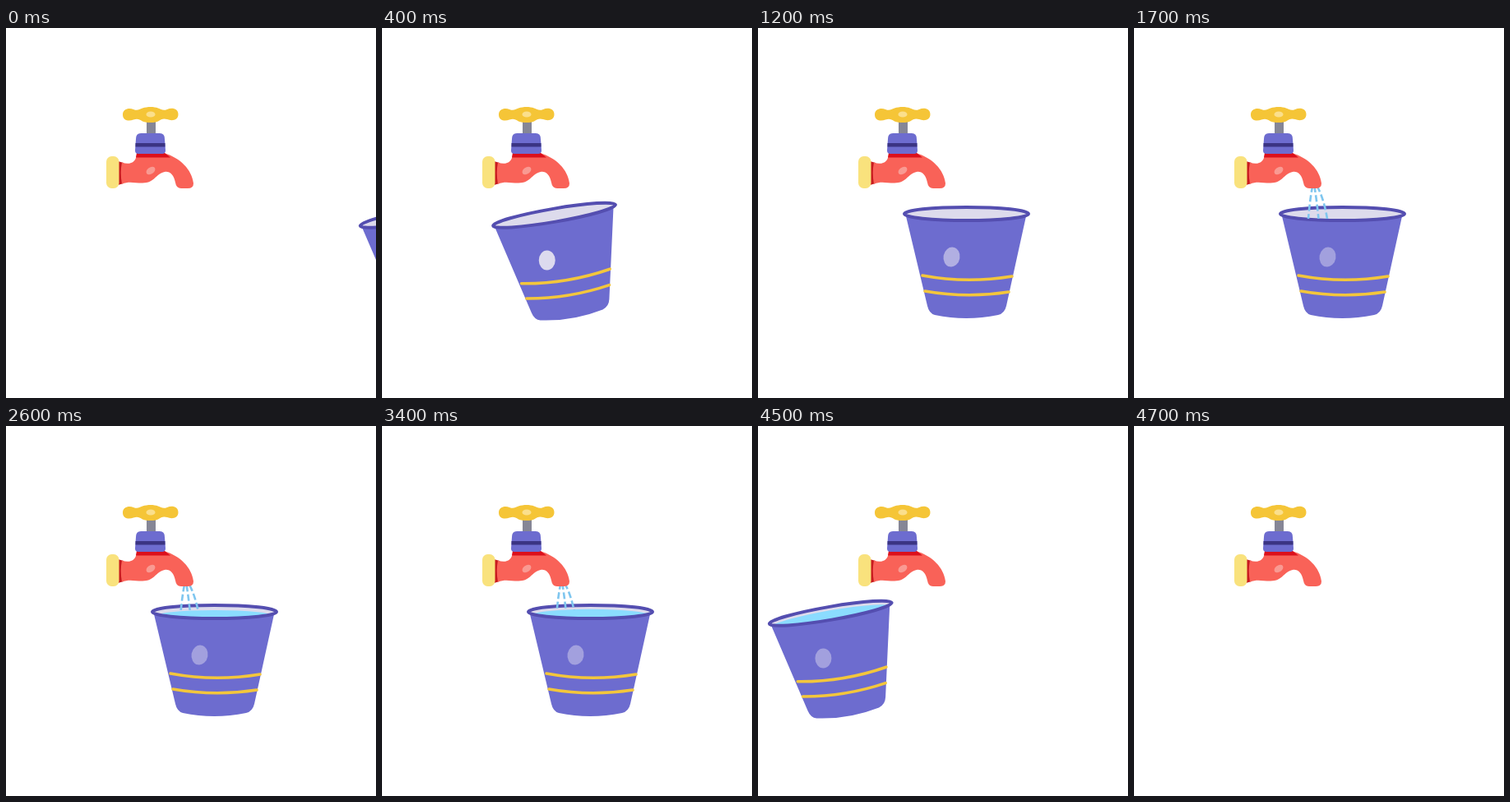
Write an HTML page that moves like this. It is 450 px wide and 450 px high and loops after 5000 ms.

```html
<!DOCTYPE html>
<html lang="en">
<head>
<meta charset="utf-8">
<title>Tap and bucket</title>
<style>
  html, body { margin: 0; width: 100%; height: 100%; overflow: hidden; background: #fff; }
  svg { display: block; width: 100%; height: 100%; }
</style>
</head>
<body>
<svg viewBox="0 0 450 450">
  <defs>
    <clipPath id="mouth"><ellipse cx="253.5" cy="226" rx="73" ry="7"/></clipPath>
    <clipPath id="fall"><rect id="fallBox" x="200" width="50"/></clipPath>
  </defs>

  <g id="bucket">
    <path fill="#6d6ccf" d="M180 229L206 338Q208 347 215 349Q253 357 292 349Q300 347 302 338L326 229Z"/>
    <ellipse cx="253.5" cy="226" rx="75.5" ry="8" fill="#dddbec"/>
    <ellipse id="water" cx="253.5" rx="74" ry="8" fill="#8bdcff" clip-path="url(#mouth)"/>
    <ellipse cx="253.5" cy="226" rx="75.5" ry="8" fill="none" stroke="#544eb0" stroke-width="4"/>
    <ellipse id="shine" cx="235.5" cy="278.5" rx="10" ry="12" fill="#dcdaee" transform="rotate(10 235.5 278.5)"/>
    <g fill="none" stroke="#f3c63c" stroke-width="3.6" stroke-linecap="round">
      <path d="M200 301Q254 311 309 302"/>
      <path d="M203 320Q254 329 305 321"/>
    </g>
  </g>

  <g id="stream" clip-path="url(#fall)" fill="none" stroke="#7fc6ef" stroke-width="2.6" stroke-dasharray="8 3.5">
    <path d="M217 193Q214 208 212 232"/>
    <path d="M219.500 193Q222 208 224.500 232"/>
    <path d="M223 193Q231 208 235 232"/>
  </g>

  <rect x="171" y="112" width="11" height="18" fill="#858696"/>
  <g id="handle">
    <path fill="#f5c537" d="M142 105.500C142 98 150 97 155 99C160 101 162 99 166 97.500C172 95.500 180 95.500 185 97.500C189 99 191 101 196 99C202 96.500 209.500 98 209.500 105C209.500 112 202 113.500 196 111C191 109.500 189 111 185 113.500C180 115.500 172 115.500 166 113.500C162 111 160 110 155 111.500C150 113.500 142 113 142 105.500Z"/>
    <ellipse cx="176" cy="105" rx="5.500" ry="3.600" fill="#fbdf8c"/>
  </g>
  <path fill="#c81a1f" d="M136 162L143 164V189L136 191Z"/>
  <path fill="#f96258" d="M141 163.500C150 167 159 164 159 152H192C212 158 226 172 228 189Q228 195 221 195H213Q207 195 206 188C204 178 199 174 193 175C182 177 181 188.500 166 188.500C156 188.500 150 186 141 189.500Q138.500 176 141 163.500Z"/>
  <path fill="#dc101c" d="M159 152H193L200 157.500H158Z"/>
  <path fill="#6d6ccf" d="M164 128H187Q193 128 193 135L194 149Q194 153 190 153H161Q157 153 157 149L158 135Q158 128 164 128Z"/>
  <path fill="#3b3483" d="M157.500 140H193.500V144.500H157.500Z"/>
  <rect x="122" y="156" width="15.500" height="39" rx="6.500" fill="#f9e27d"/>
  <ellipse cx="176" cy="173.500" rx="6" ry="4" fill="#f99a92" transform="rotate(-35 176 173.500)"/>
</svg>
<script>
const LOOP = 5000, STEP = 100;
const $ = id => document.getElementById(id);

// Steps of [time, value]
const slide = [[0, 272], [100, 190], [200, 105], [300, 30], [400, -23.7], [500, -23], [600, -15],
  [700, -9], [800, -4.5], [900, 0], [4300, 0], [4400, -42], [4500, -145], [4600, -255], [4700, -370]];
const tilt = [[0, -9.8], [400, -9.8], [500, -7.5], [600, -4], [700, -1.2], [800, 0],
  [4300, 0], [4400, -5], [4500, -9.8]];
const shine = [[900, 1], [1300, 0.48]];
const level = [[1700, 241], [2600, 232], [3600, 230.5]];
const head = [[1200, 193], [1400, 232], [1900, 232], [2600, 224]];
const tail = [[3800, 193], [4200, 232]];

function at(steps, t) {
  if (t <= steps[0][0]) return steps[0][1];
  for (let i = 1; i < steps.length; i++) {
    const [t0, a] = steps[i - 1], [t1, b] = steps[i];
    if (t <= t1) return a + (b - a) * (t - t0) / (t1 - t0);
  }
  return steps[steps.length - 1][1];
}

// Width of the handle during a half turn
function turn(t, start, end) {
  const p = Math.min(1, Math.max(0, (t - start) / (end - start)));
  const eased = (p + p * p * (3 - 2 * p)) / 2;
  return Math.max(0.25, Math.abs(Math.cos(Math.PI * eased)));
}

function draw(t) {
  $("bucket").setAttribute("transform",
    `translate(${at(slide, t)} 0) rotate(${at(tilt, t)} 253.5 345)`);
  $("shine").setAttribute("opacity", at(shine, t));
  $("water").setAttribute("cy", at(level, t));

  const width = t < 2000 ? turn(t, 700, 1200) : turn(t, 3400, 4000);
  $("handle").setAttribute("transform", `translate(175.5 0) scale(${width} 1) translate(-175.5 0)`);

  const top = at(tail, t);
  $("fallBox").setAttribute("y", top);
  $("fallBox").setAttribute("height", Math.max(0, at(head, t) - top));
  $("stream").setAttribute("stroke-dashoffset", -(t * 0.04 % 11.5));
}

const begin = performance.now();
function tick() {
  const t = (performance.now() - begin) % LOOP;
  draw(Math.floor(t / STEP) * STEP);
  requestAnimationFrame(tick);
}
tick();
</script>
</body>
</html>
```
